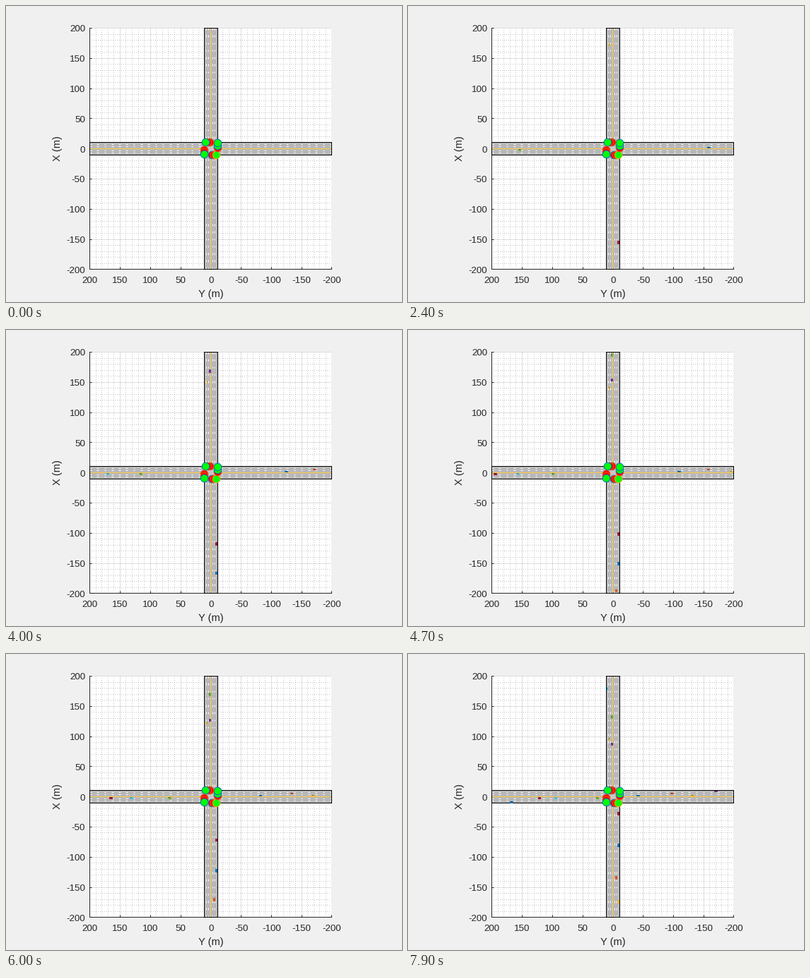
A matplotlib script for the animation above (8000 ms loop, 560x420 px).

```python
import numpy as np
import matplotlib.pyplot as plt
from matplotlib.animation import FuncAnimation
from matplotlib.collections import LineCollection
from matplotlib.patches import Rectangle

W, H, DPI = 560, 420, 100
PX = 72 / DPI                     # one pixel in points
INK = (0.15, 0.15, 0.15)
ROAD, CROSS = "#b8b8b8", "#c8c8c8"
YELLOW = "#ffcb45"
END, HALF, LANE = 200, 10.8, 3.6
LENGTH, WIDTH, OVERHANG = 4.2, 1.9, 1.35
PALETTE = ["#0072bd", "#d95319", "#edb120", "#7e2f8e",
           "#77ac30", "#4dbeee", "#a2142f"]

# Per wave and approach (right, top, left, bottom): lane offset, speed in m/s
WAVES = [
    [(1.8, 21.3), (5.4, 14.0), (-1.8, 23.9), (-9.0, 23.2)],
    [(5.4, 18.75), (1.8, 20.7), (-1.8, 19.4), (-9.0, 22.0)],
    [(1.8, 19.9), (1.8, 19.8), (-1.8, 22.9), (-5.4, 19.2)],
    [(9.0, 20.7), (9.0, 14.3), (-9.0, 22.7), (-9.0, 18.2)],
]
FIRST, GAP = 0.5, 2.0             # launch times of the waves, seconds
BRAKING = (0, 2)                  # wave and approach facing a red light
BRAKE_AT, BRAKE = 6.7, 4.5

plt.rcParams["font.family"] = "Liberation Sans"
fig = plt.figure(figsize=(W / DPI, H / DPI), dpi=DPI, facecolor="#f0f0f0")
# half a pixel up and left, so that lines snap to the pixel they start in
SIDE, MID_X, MID_Y = 0.815 * H, 289.3, 202.15
ax = fig.add_axes([(MID_X - SIDE / 2) / W, 1 - (MID_Y + SIDE / 2) / H,
                   SIDE / W, SIDE / H])
ax.set_axisbelow(True)


def setup_axes():
    ticks = np.arange(-END, END + 1, 50)
    minor = [m for m in range(-END, END + 1, 10) if m % 50]
    for axis in (ax.xaxis, ax.yaxis):
        axis.set_ticks(ticks)
        axis.set_ticks(minor, minor=True)
    ax.tick_params(which="major", direction="in", length=3.4 * PX, width=PX,
                   color=INK, labelleft=False, labelbottom=False)
    ax.tick_params(which="minor", length=0)
    ax.grid(which="major", color=INK, alpha=0.15, lw=PX)
    ax.grid(which="minor", color="0.1", alpha=0.25, lw=PX, ls=(0.5, (1, 2)))
    for name, spine in ax.spines.items():
        spine.set_visible(name in ("left", "bottom"))
        spine.set_color(INK)
        spine.set_linewidth(PX)
    style = dict(textcoords="offset pixels", va="baseline", color=INK,
                 fontsize=13.33 * PX, annotation_clip=False)
    for t in ticks:
        ax.annotate(str(t), (t, 0), (0.5, -19.5), ha="center",
                    xycoords=("data", "axes fraction"), **style)
        ax.annotate(str(t), (0, t), (-6, -5.5), ha="right",
                    xycoords=("axes fraction", "data"), **style)
    title = dict(ha="center", va="baseline", color=INK, fontsize=14.67 * PX)
    fig.text(289.8 / W, 1 - 413 / H, "Y (m)", **title)
    fig.text(77 / W, 1 - 201.6 / H, "X (m)", rotation=90,
             rotation_mode="anchor", **title)


def segments(lines, color, z):
    ax.add_collection(LineCollection(lines, colors=color, linewidths=PX,
                                     zorder=z, clip_on=False), autolim=False)


def draw_roads():
    def box(x, y, w, h, color):
        ax.add_patch(Rectangle((x, y), w, h, fc=color, ec="none", zorder=3))

    box(-HALF, -END, 2 * HALF, 2 * END, ROAD)
    box(-END, -HALF, 2 * END, 2 * HALF, ROAD)
    box(-HALF, -HALF, 2 * HALF, 2 * HALF, CROSS)
    dashes, centre, border = [], [], []
    for s in (-1, 1):
        centre.append([(0, s * HALF), (0, s * END)])
        border.append([(-HALF, s * HALF), (-HALF, s * END),
                       (HALF, s * END), (HALF, s * HALF)])
        for off in (-2 * LANE, -LANE, LANE, 2 * LANE):
            for a in np.arange(END, HALF + 3, -12):
                dashes.append([(off, s * a), (off, s * (a - 3))])

    def both(lines):
        return lines + [[(b, a) for a, b in line] for line in lines]

    segments(both(dashes), "white", 4)
    segments(both(centre), YELLOW, 4)
    segments(both(border), "black", 5)


def draw_lights():
    edge = 10.8
    red, green = "#ff0000", "#00ff00"
    lights = [
        (-1.8, -edge, red, 0), (-5.4, -edge, red, 1), (-9, -edge, green, 2),
        (-edge, 1.8, red, 1), (-edge, 5.4, green, 0), (-edge, 9, green, 0),
        (1.8, edge, red, 1), (5.4, edge, red, 1), (9, edge, green, 0),
        (edge, -1.8, red, 1), (edge, -5.4, red, 1), (edge, -9, green, 0),
    ]
    for y, x, fill, rim in lights:
        ax.plot(y, x, "o", ms=10.6 * PX, mfc=fill, mec=PALETTE[rim],
                mew=PX, zorder=8)


def make_cars():
    cars = []
    for w, wave in enumerate(WAVES):
        for side, (lane, speed) in enumerate(wave):
            color = PALETTE[(w + 2 * side) % 7]
            upright = side % 2
            size = (WIDTH, LENGTH) if upright else (LENGTH, WIDTH)
            body = Rectangle((0, 0), *size, fc=color, ec=color,
                             lw=PX, zorder=6)
            cabin = Rectangle((0, 0), size[0] * 0.5, size[1] * 0.5,
                              fc="black", ec="none", alpha=0.4, zorder=7)
            for patch in (body, cabin):
                ax.add_patch(patch)
            cars.append((w, side, lane, speed, body, cabin))
    return cars


def place(patch, x, y):
    patch.set_xy((x - patch.get_width() / 2, y - patch.get_height() / 2))


def update(frame):
    t = frame / 10
    limit = END
    for w, side, lane, speed, body, cabin in cars:
        age = t - FIRST - GAP * w
        on = age > -1e-6
        body.set_visible(on)
        cabin.set_visible(on)
        if not on:
            continue
        rear = END + OVERHANG - speed * age
        if (w, side) == BRAKING:
            rear += BRAKE / 2 * max(0, t - BRAKE_AT) ** 2
        limit = max(limit, rear)
        d = rear - LENGTH / 2
        spot = [(-d, lane), (lane, d), (d, lane), (lane, -d)][side]
        place(body, *spot)
        place(cabin, *spot)
    # limits stay tight around everything, so a new car widens them briefly
    ax.set_xlim(limit, -limit)
    ax.set_ylim(-limit, limit)
    return []


setup_axes()
draw_roads()
draw_lights()
cars = make_cars()
update(0)
anim = FuncAnimation(fig, update, frames=80, interval=100, repeat=True,
                     repeat_delay=0, blit=False)
plt.show()
```
